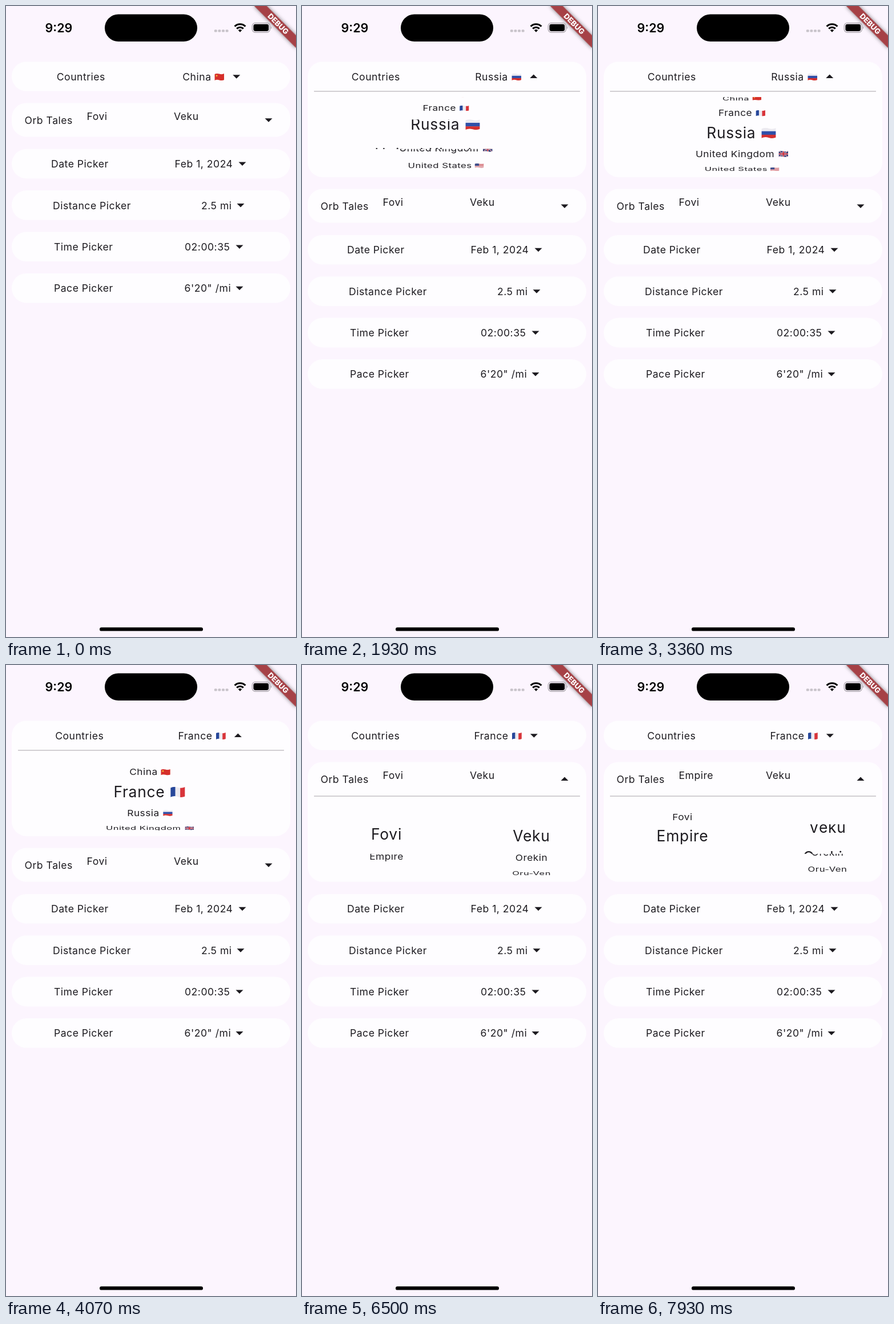
These frames come from a looping animation (508 by 1102 pixels, 8000 ms). An HTML page:

```html
<!DOCTYPE html>
<html lang="en">
<head>
<meta charset="utf-8">
<title>Pickers</title>
<style>
html, body { margin: 0; width: 100%; height: 100%; overflow: hidden; background: #fcf5fe; }
svg { display: block; width: 100vw; height: 100vh; }
text { font: 17.6px Inter, sans-serif; letter-spacing: .5px; fill: #1d1b20; white-space: pre; }
.mid { text-anchor: middle; }
.clock { font-size: 21.5px; font-weight: 600; letter-spacing: 0; fill: #000; text-anchor: middle; }
.debug { font-size: 13px; font-weight: 800; letter-spacing: 0; fill: #fff; text-anchor: middle; }
.card { fill: #fefdff; }
.rule { stroke: #c3c0c5; stroke-width: 1.3; }
.arrow { fill: #1d1b20; }
.band { filter: drop-shadow(0 0 3.5px rgba(0, 0, 0, .5)); }
</style>
</head>
<body>
<svg id="stage" viewBox="0 0 508 1102" preserveAspectRatio="none"></svg>
<script>
const LOOP = 8000, STEP = 1000 / 7;
const OPEN = 150.2;
const AXIS = 254;
// Wheel geometry: radius, angle per item, perspective, magnification, magnified pitch
const R = 88, ANGLE = .425, PERSP = .00232, MAG = 1.5, PITCH = 51.7;

// Name, flag id, text width
const countries = [
  ['China', 'cn', 49], ['France', 'fr', 59.5], ['Russia', 'ru', 57],
  ['United Kingdom', 'gb', 141], ['United States', 'us', 116]
];
const films = ['Fovi', 'Empire'];
const heroes = ['Veku', 'Orekin', 'Oru-Ven'];

// Label, label x, value, value x, arrow x
const rows = [
  ['Date Picker', 79, 'Feb 1, 2024', 295.5, 414],
  ['Distance Picker', 82, '2.5 mi', 342, 411],
  ['Time Picker', 84, '02:00:35', 313, 409],
  ['Pace Picker', 84, '6\'20" /mi', 312.5, 409]
];

// Scroll positions: time, item
const tracks = {
  country: [[1220, 0], [1360, .2], [1930, 2.29], [2220, 2.85], [2360, 2.96], [2500, 3],
            [2645, 3], [2790, 2.72], [3215, 2.06], [3360, 2], [3645, 2], [3790, 1.7], [3930, 1.2], [4070, 1]],
  film: [[6215, 0], [6500, .058], [6640, .22], [6930, .74], [7215, .96], [7360, 1]],
  hero: [[7360, 0], [7930, .29]]
};

const text = (x, y, s, attrs = '') => `<text x="${x}" y="${y}" ${attrs}>${s}</text>`;
const rect = (x, y, w, h, fill, r = 0) =>
  `<rect x="${x}" y="${y}" width="${w}" height="${h}" rx="${r}" fill="${fill}"/>`;
const card = (y, h, id = '') =>
  `<rect class="card" id="${id}" x="10" y="${y}" width="488" height="${h}" rx="25.8"/>`;
const arrow = (x, y, id = '') =>
  `<path class="arrow" id="${id}" d="M-6.5-3.2H6.5L0 3.3Z" transform="translate(${x} ${y})"/>`;
const rule = y => `<path class="rule" d="M21 ${y}H487"/>`;
const flag = (id, body) => `<g id="${id}" clip-path="url(#wave)">${body}</g>`;

function flags() {
  const cols = ['#27479a', '#eceaf0', '#d8343a'].map((c, i) => rect(i * 5.67, 0, 5.8, 13, c)).join('');
  const bars = ['#eceaf0', '#2f4fa8', '#d3302f'].map((c, i) => rect(0, i * 4.1, 17, i < 2 ? 4.2 : 5, c)).join('');
  const stripes = [0, 1, 2, 3, 4, 5, 6].map(i => rect(0, i * 1.85, 17, .95, '#d0474c')).join('');
  const cross = (c, w1, w2) =>
    `<path d="M0 0L17 12.4M17 0L0 12.4" stroke="${c}" stroke-width="${w1}"/>` +
    `<path d="M8.5 0V13M0 6.2H17" stroke="${c}" stroke-width="${w2}"/>`;
  return flag('cn', rect(0, 0, 17, 13, '#d62f2a') + '<circle cx="3.8" cy="4" r="1.4" fill="#f5c63c"/>') +
    flag('fr', cols) + flag('ru', bars) +
    flag('gb', rect(0, 0, 17, 13, '#1c3070') + cross('#e2dfe8', 1.5, 3.3) + cross('#c92a38', .6, 2)) +
    flag('us', rect(0, 0, 17, 13, '#eceaf0') + stripes + rect(0, 0, 8, 6.5, '#3d4f8c'));
}

const countryItem = ([name, id, w]) => {
  const x = -2 - (w + 24) / 2;
  return text(x, 4.6, name) + `<use href="#${id}" x="${x + w + 7}" y="-7.6"/>`;
};
const nameItem = name => text(0, 2.8, name, 'class="mid"');

function wheel(id, x, y, items) {
  const layer = clip => `<g clip-path="url(#${clip})">${items.map(s => `<g>${s}</g>`).join('')}</g>`;
  return `<g id="${id}" transform="translate(${x} ${y})">${layer('rim')}${layer('lens')}</g>`;
}

function statusBar() {
  const dots = [0, 1, 2, 3].map(i => rect(364.8 + i * 6.6, 41.2, 5, 4.4, '#c8c3ca', 1.6)).join('');
  return text(92.5, 46, '9:29', 'class="clock"') + rect(173, 14.5, 162, 47.5, '#000', 23.75) + dots +
    `<g fill="none" stroke="#000" stroke-width="3.1">
       <path d="M400.6 35.6a13.3 13.3 0 0 1 18.8 0M404.2 39.6a8.2 8.2 0 0 1 11.6 0"/></g>
     <path d="M406.8 42.3a4.5 4.5 0 0 1 6.4 0L410 45.8Z"/>
     <rect x="431.3" y="29.6" width="31" height="16.4" rx="5.2" fill="none" stroke="#aaa5ac" stroke-width="1.3"/>` +
    rect(433.4, 31.7, 26.8, 12.2, '#000', 3.4) +
    '<path d="M463.9 35.2q2.6 2.6 0 5.2Z" fill="#aaa5ac"/>';
}

const ribbon = () => `<g transform="translate(476.9 31.1) rotate(45)">
  <rect class="band" x="-51.7" y="-7.75" width="103.4" height="15.5" fill="#a64146"/>
  ${text(0, 4.7, 'DEBUG', 'class="debug"')}</g>`;

document.getElementById('stage').innerHTML = `<defs>
  <clipPath id="wave"><path d="M0 1.3Q4-.7 8.5.8T17 .3V11.3Q13 13 8.5 11.6T0 12.1Z"/></clipPath>
  <clipPath id="rim"><path d="M-244-65H244V-25.8H-244ZM-244 25.8H244V65H-244Z"/></clipPath>
  <clipPath id="lens"><path d="M-244-25.8H244V25.8H-244Z"/></clipPath>
  ${flags()}</defs>` +
  rect(0, 0, 508, 1102, '#fcf5fe') +
  card(97.2, 51.5, 'cardA') +
  text(0, 129.7, 'Countries', 'id="label"') + text(0, 130.2, '', 'id="country"') +
  '<use id="flag" y="117.8"/>' + arrow(0, 123.3, 'arrowA') +
  `<g id="bodyA">${rule(149)}${wheel('wheelA', AXIS, 224, countries.map(countryItem))}</g>` +
  '<g id="below">' + card(169.4, 59, 'cardB') +
  text(32.5, 205.7, 'Orb Tales') + text(141.5, 199.3, '', 'id="film"') + text(294, 199.3, '', 'id="hero"') +
  arrow(460, 199.3, 'arrowB') + '</g>' +
  `<g id="bodyB">${rule(229)}${wheel('wheelF', 148, 304, films.map(nameItem))}` +
  wheel('wheelH', 402, 304, heroes.map(nameItem)) + '</g>' +
  '<g id="rows">' + rows.map(([label, lx, value, vx, ax], i) => {
    const y = 249.7 + i * 72.4;
    return card(y, 51.6) + text(lx, y + 32.4, label) + text(vx, y + 32.4, value) + arrow(ax, y + 26.1);
  }).join('') + '</g>' +
  statusBar() + rect(164, 1085.2, 181, 6.4, '#000', 3.2) + ribbon();

const $ = id => document.getElementById(id);
const set = (id, key, value) => $(id).setAttribute(key, value);
const show = (id, on) => set(id, 'display', on ? 'inline' : 'none');

function sample(track, t) {
  const i = track.findIndex(k => k[0] >= t);
  if (i === 0) return track[0][1];
  if (i < 0) return track[track.length - 1][1];
  const [t0, a] = track[i - 1], [t1, b] = track[i];
  return a + (b - a) * (t - t0) / (t1 - t0);
}

function turn(id, pos) {
  const [rim, lens] = $(id).children;
  [...rim.children].forEach((item, i) => {
    const a = (i - pos) * ANGLE, sin = Math.sin(a), cos = Math.cos(a);
    const w = 1 + PERSP * R * (1 - cos);
    const sy = cos / w - PERSP * R * sin * sin / (w * w);
    item.setAttribute('display', Math.abs(a) < 1.2 ? 'inline' : 'none');
    item.setAttribute('transform', `translate(0 ${R * sin / w}) scale(${1 / w} ${sy})`);
    lens.children[i].setAttribute('transform', `translate(0 ${(i - pos) * PITCH}) scale(${MAG})`);
  });
}

function point(id, x, y, up) {
  set(id, 'transform', `translate(${x} ${y}) scale(1 ${up ? -1 : 1})`);
}

function draw(t) {
  const openA = t >= 495 && t < 4200, openB = t >= 5060;
  const pos = sample(tracks.country, t), film = sample(tracks.film, t), hero = sample(tracks.hero, t);

  // Header contents share the free space evenly around them
  const [name, id, w] = countries[Math.round(pos)];
  const q = (320 - w) / 4, x = 106 + 3 * q;
  set('label', 'x', 21 + q);
  set('country', 'x', x);
  $('country').textContent = name;
  set('flag', 'href', '#' + id);
  set('flag', 'x', x + w + 7);
  point('arrowA', 471.5 - q, openA ? 122.8 : 123.5, openA);
  point('arrowB', 460, openB ? 198.8 : 199.5, openB);
  $('film').textContent = films[Math.round(film)];
  $('hero').textContent = heroes[Math.round(hero)];

  set('cardA', 'height', openA ? 51.5 + OPEN : 51.5);
  set('cardB', 'height', openB ? 59 + OPEN : 59);
  set('below', 'transform', `translate(0 ${openA ? OPEN : 0})`);
  set('rows', 'transform', `translate(0 ${openA || openB ? OPEN : 0})`);
  show('bodyA', openA);
  show('bodyB', openB);
  turn('wheelA', pos);
  turn('wheelF', film);
  turn('wheelH', hero);
}

const start = performance.now();
function tick() {
  const t = (performance.now() - start) % LOOP;
  // The screen refreshes seven times a second
  draw((Math.floor((t + 3) / STEP - .5) + .5) * STEP);
  requestAnimationFrame(tick);
}
tick();
</script>
</body>
</html>
```
